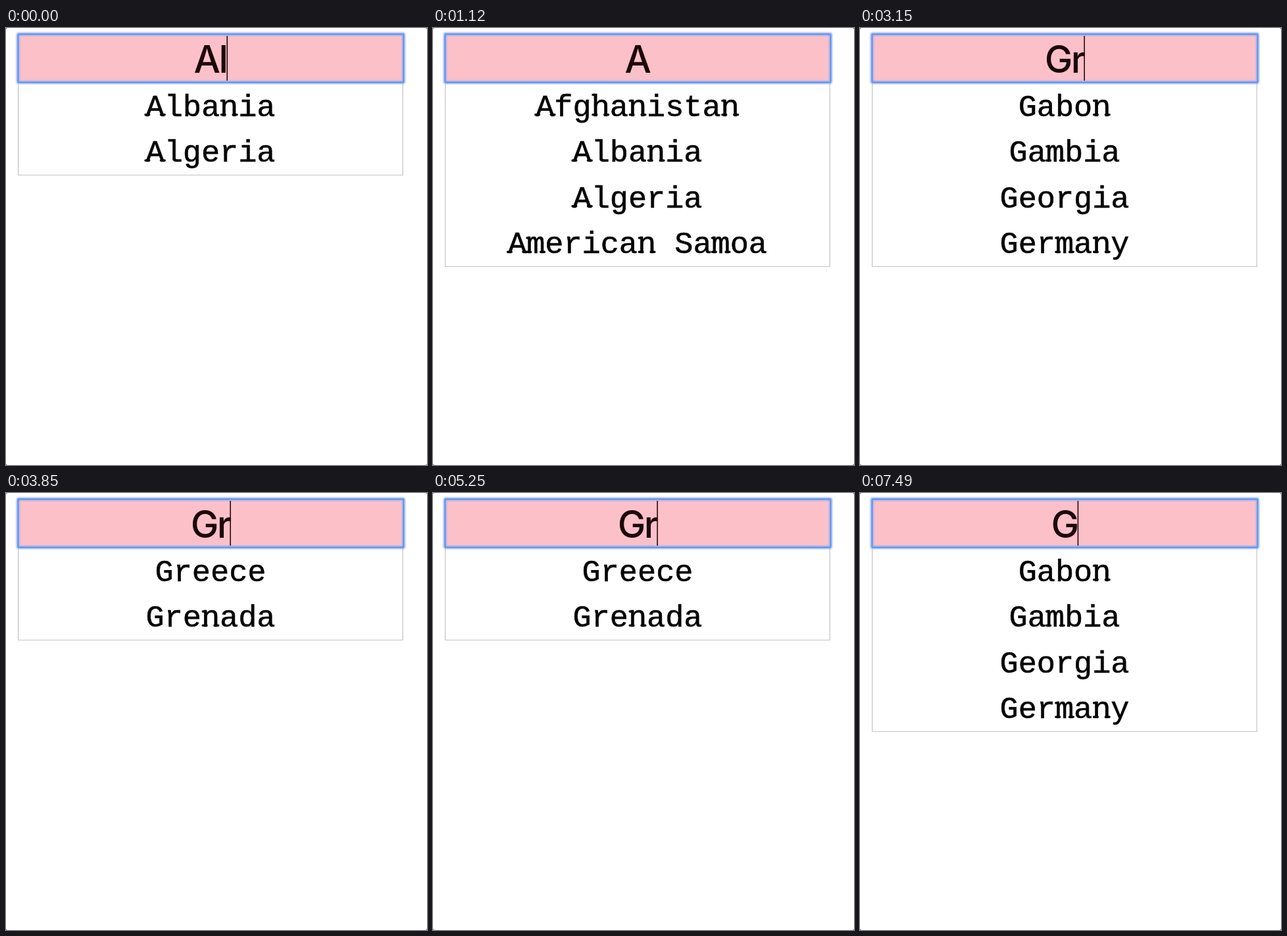
An HTML page that plays this animation: 640x664 px, repeating every 7630 ms.

```html
<!DOCTYPE html>
<html lang="en">
<head>
<meta charset="utf-8">
<title>Country autocomplete</title>
<style>
  html, body { margin: 0; width: 100%; height: 100%; overflow: hidden; background: #fff; }
  svg { display: block; width: 100vw; height: 100vh; }
  text { text-anchor: middle; white-space: pre; }
  #query { font: 450 57px Inter, Roboto, sans-serif; letter-spacing: -2.4px; fill: #1c0609; }
  .item { font: 400 46.9px "Liberation Mono", "Courier New", monospace; fill: #050505; stroke: #050505; stroke-width: .6px; }
  .slabs { fill: none; stroke: #050505; stroke-width: 3.6px; stroke-linecap: round; }
</style>
</head>
<body>
<svg viewBox="0 0 640 664">
  <defs>
    <filter id="soft" filterUnits="userSpaceOnUse" x="0" y="0" width="640" height="100">
      <feGaussianBlur stdDeviation="1.3"/>
    </filter>
  </defs>
  <rect width="640" height="664" fill="#fff"/>
  <path d="M0 0h2L0 2zM640 0h-2l2 2zM0 664h2l-2-2zM640 664h-2l2-2z" fill="#8c8c8c"/>
  <path id="border" fill="none" stroke="#c4c4c4" stroke-width="1.2"/>
  <g id="list"></g>
  <rect x="18" y="9" width="587" height="74" fill="#fcc0c8"/>
  <g fill="none">
    <rect x="18.2" y="9.2" width="586.3" height="73.4" rx="1" stroke="#8fb4fb" stroke-width="5" filter="url(#soft)"/>
    <rect x="18.4" y="9.3" width="586" height="73.3" rx="1" stroke="#5f86da" stroke-width="1.7" stroke-opacity=".85"/>
  </g>
  <text id="query" x="310.6" y="68"></text>
  <rect id="caret" y="12" width="1.6" height="68" fill="#2a0a0e"/>
</svg>
<script>
const LOOP = 7630;
const MAX_ITEMS = 4;
const CENTER = 311, ROW = 69.5;
const EM = 46.9, PITCH = EM * 0.6, X_HEIGHT = EM * 0.53, ASCENT = EM * 0.72;
const COUNTRIES = [
  "Afghanistan", "Albania", "Algeria", "American Samoa",
  "Gabon", "Gambia", "Georgia", "Germany", "Greece", "Grenada"
];

// [start in ms, value]; each value holds until the next start
const TYPED = [[0, "Al"], [560, "A"], [1680, ""], [2240, "G"], [2800, "Gr"], [6090, "G"]];
const SEARCHED = [[0, "Al"], [770, "A"], [1750, ""], [2590, "G"], [3220, "Gr"], [6300, "G"]];
const CARET_ON = [
  [0, true], [1050, false], [1610, true], [2170, false], [2240, true],
  [3290, false], [3780, true], [4270, false], [4760, true],
  [5390, false], [5810, true], [6580, false], [7140, true]
];
const CARET_X = { "": 311.3, A: 329.6, Al: 335.4, G: 330.6, Gr: 340.3 };

// Stem positions, in em, of the letters that stand on slab feet
const STEMS = { A: [0.05, 0.55], h: [0.11, 0.49], n: [0.11, 0.49], m: [0.08, 0.52] };

const $ = id => document.getElementById(id);
const query = $("query"), caret = $("caret"), list = $("list"), border = $("border");

function valueAt(track, t) {
  let value = track[0][1];
  for (const [start, next] of track) if (t >= start) value = next;
  return value;
}

function matches(prefix) {
  if (!prefix) return [];
  return COUNTRIES.filter(name => name.startsWith(prefix)).slice(0, MAX_ITEMS);
}

function slabPath(name, baseline) {
  const left = CENTER - name.length * PITCH / 2;
  return [...name].map((letter, i) => {
    const stems = STEMS[letter];
    if (!stems) return "";
    const xs = stems.map(s => left + i * PITCH + s * EM);
    const feet = xs.map(x => `M${x - 2.8} ${baseline - 1.8}h5.6`).join("");
    if (letter === "A") return feet;
    const top = baseline + 1.8 - (letter === "h" ? ASCENT : X_HEIGHT);
    return feet + `M${xs[0] - 2.8} ${top}h2.8`;
  }).join("");
}

function add(tag, className) {
  const node = document.createElementNS("http://www.w3.org/2000/svg", tag);
  node.setAttribute("class", className);
  return list.appendChild(node);
}

const rows = Array.from({ length: MAX_ITEMS }, (_, i) => {
  const baseline = 133.5 + i * ROW;
  const label = add("text", "item");
  label.setAttribute("x", CENTER);
  label.setAttribute("y", baseline);
  return { label, baseline, slabs: add("path", "slabs") };
});

function draw(t) {
  const typed = valueAt(TYPED, t);
  const found = matches(valueAt(SEARCHED, t));
  query.textContent = typed;
  caret.setAttribute("x", CARET_X[typed]);
  caret.setAttribute("visibility", valueAt(CARET_ON, t) ? "visible" : "hidden");
  rows.forEach(({ label, baseline, slabs }, i) => {
    const name = found[i] || "";
    label.textContent = name;
    slabs.setAttribute("d", slabPath(name, baseline));
  });
  const bottom = 84.5 + found.length * ROW;
  border.setAttribute("d", found.length ? `M18.6 83V${bottom}H603.2V83` : "");
}

const begin = performance.now();
function tick() {
  draw((performance.now() - begin) % LOOP);
  requestAnimationFrame(tick);
}
tick();
</script>
</body>
</html>
```
